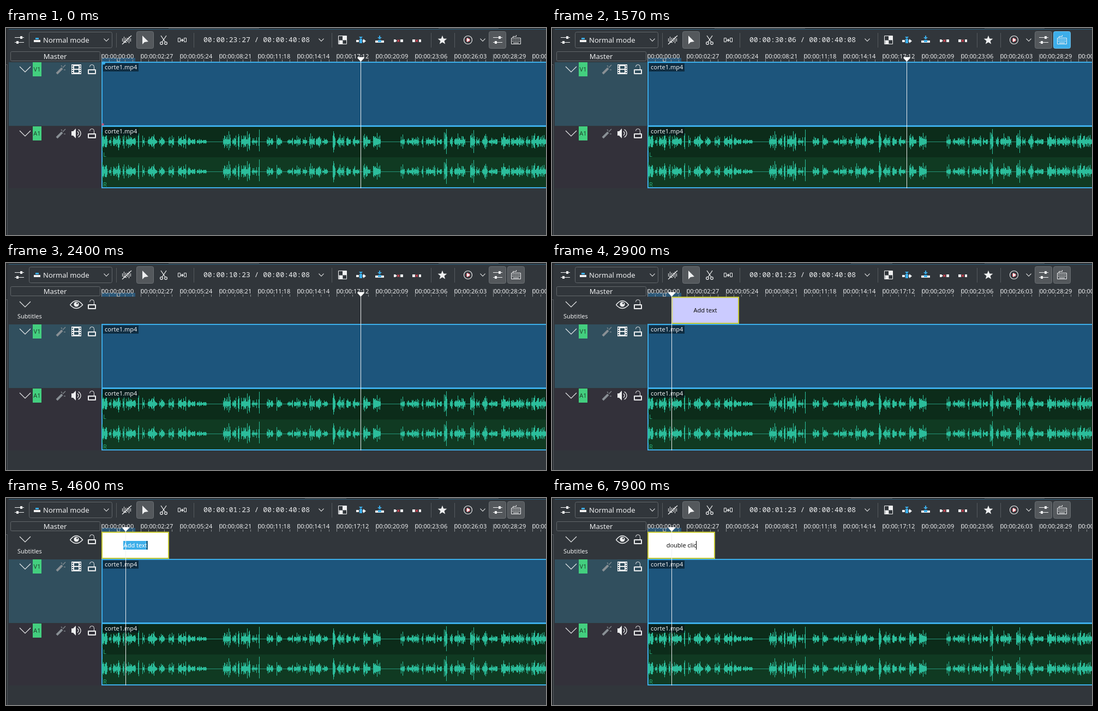
These frames come from a looping animation (990x381 px, 8 s). An HTML page with a canvas:

```html
<!DOCTYPE html>
<html lang="en">
<head>
<meta charset="utf-8">
<title>Subtitle track</title>
<style>
html, body { margin: 0; width: 100%; height: 100%; overflow: hidden; background: #31363b; }
canvas { display: block; width: 990px; height: 381px; }
</style>
</head>
<body>
<canvas id="stage" width="990" height="381"></canvas>
<script>
const ctx = document.getElementById('stage').getContext('2d');
const LOOP = 8000;
const BG = '#31363b', FG = '#eff0f1', BLUE = '#3daee9', GREY = '#62676b', WAVE = '#2bbd9b', RED = '#da4453';
const SMALL = '11px "Noto Sans", sans-serif';
const NORMAL = '13px "Noto Sans", sans-serif';
const MONO = '13px "Noto Sans Mono", monospace';
const ORIGIN = 175.5, TICK = 71.85;

// Bursts of sound: start, length, half height
const bursts = [
  [176, 10, 17], [189, 4, 8], [196, 14, 15], [214, 3, 13], [220, 18, 12], [242, 2, 15], [250, 4, 11],
  [260, 17, 13], [281, 10, 9], [298, 10, 11], [315, 16, 13], [333, 14, 8], [350, 18, 5], [398, 14, 19],
  [415, 7, 11], [425, 3, 14], [431, 17, 19], [451, 10, 8], [463, 2, 22], [478, 12, 9], [496, 10, 12],
  [516, 10, 7], [528, 12, 11], [544, 8, 8], [556, 10, 15], [568, 10, 10], [580, 10, 6], [599, 5, 19],
  [607, 13, 13], [624, 8, 9], [636, 12, 10], [655, 13, 14], [673, 14, 16], [723, 8, 13], [735, 22, 9],
  [762, 3, 10], [770, 17, 11], [790, 9, 7], [803, 6, 23], [814, 5, 9], [822, 20, 15], [851, 9, 21],
  [862, 6, 8], [873, 10, 14], [885, 16, 7], [908, 16, 15], [926, 24, 11], [953, 8, 10], [963, 27, 15]
];

// Text typed into the subtitle, by time
const typed = 'double clic';
const keys = [5700, 5870, 6070, 6370, 6570, 6700, 6900, 7130, 7330, 7600, 7900];

function random(seed) {
  return () => (seed = (seed * 16807) % 2147483647) / 2147483647;
}
function rect(color, x, y, w, h) {
  ctx.fillStyle = color;
  ctx.fillRect(x, y, w, h);
}
function frame(color, x, y, w, h, r = 0, fill) {
  ctx.beginPath();
  ctx.roundRect(x + 0.5, y + 0.5, w - 1, h - 1, r);
  if (fill) { ctx.fillStyle = fill; ctx.fill(); }
  ctx.strokeStyle = color;
  ctx.lineWidth = 1;
  ctx.stroke();
}
function trace(pts) {
  ctx.beginPath();
  for (let i = 0; i < pts.length; i += 2) ctx.lineTo(pts[i], pts[i + 1]);
}
function line(color, width, ...pts) {
  trace(pts);
  ctx.strokeStyle = color;
  ctx.lineWidth = width;
  ctx.stroke();
}
function shape(color, ...pts) {
  trace(pts);
  ctx.fillStyle = color;
  ctx.fill();
}
function disc(color, x, y, r, ring) {
  ctx.beginPath();
  ctx.arc(x, y, r, 0, 7);
  if (ring) { ctx.strokeStyle = color; ctx.lineWidth = ring; ctx.stroke(); }
  else { ctx.fillStyle = color; ctx.fill(); }
}
function text(str, x, y, font = SMALL, color = FG, align = 'left') {
  ctx.font = font;
  ctx.fillStyle = color;
  ctx.textAlign = align;
  ctx.fillText(str, x, y);
}
function chevron(x, y, w, h) {
  line(FG, 1.1, x - w, y - h, x, y + h, x + w, y - h);
}
function timecode(n) {
  const two = v => String(v).padStart(2, '0');
  return '00:00:' + two(Math.floor(n / 30)) + ':' + two(n % 30);
}

function sliders(x) {
  rect(FG, x - 8, 17, 17, 1);
  rect(FG, x - 8, 26, 17, 1);
  rect(FG, x + 2, 15, 4, 5);
  rect(FG, x - 5, 24, 4, 5);
}
function pressed(x) {
  frame('#6b7074', x, 6, 32, 32, 3, '#54585c');
}
function cross(x, y) {
  line(RED, 1.4, x - 2, y - 2, x + 2, y + 2);
  line(RED, 1.4, x - 2, y + 2, x + 2, y - 2);
}
function lock(x, y) {
  frame(FG, x - 7, y, 15, 9);
  frame(FG, x - 6, y + 1, 13, 7);
  ctx.beginPath();
  ctx.arc(x + 0.5, y - 4.5, 4, Math.PI, 0);
  ctx.lineTo(x + 4.5, y);
  ctx.stroke();
}
function wand(y) {
  line('#899095', 4, 93, y + 8, 103, y - 2);
  line('#899095', 1.2, 104, y - 3, 109, y - 8);
  line('#899095', 1.2, 101, y - 7, 103, y - 5);
  line('#899095', 1.2, 106, y + 1, 109, y + 1);
}

function keyboard(t) {
  if (t >= 1530 && t < 2030) frame('#6cc3f0', 919, 6, 32, 32, 3, BLUE);
  else if (t >= 2030) pressed(919);
  else if (t >= 1030) frame(BLUE, 919, 6, 32, 32, 3);
  frame(FG, 926, 18, 18, 12);
  line(FG, 1, 929.5, 18, 929.5, 15.5, 935.5, 15.5, 935.5, 13);
  for (let r = 0; r < 2; r++)
    for (let c = 0; c < 6; c++) rect(FG, 928 + c * 2.5, 21 + r * 3, 1.3, 1.3);
  rect(FG, 930, 27, 10, 1);
}

function toolbar(t, code) {
  rect('#2a2e32', 0, 0, 990, 2);
  const left = t < 2900 ? [298, 166] : [548, 76];
  rect('#565b5f', left[0], 0, left[1], 1);
  rect('#565b5f', 793, 0, 110, 1);
  rect(t >= 30 && t < 1030 ? '#44494e' : '#2d617f', 5, 2, 985, 1);
  rect('#262a2e', 0, 0, 2, 381);
  rect('#555a5e', 2, 67, 1, 314);
  rect('#555a5e', 0, 67, 2, 1);
  for (const x of [202, 344, 597, 779, 822]) rect('#555a5e', x, 9, 1, 27);

  sliders(24);
  frame(GREY, 42, 7, 153, 30, 3);
  rect(FG, 51, 22, 12, 4);
  rect(BLUE, 54, 18, 6, 3);
  text('Normal mode', 68, 27, NORMAL);
  chevron(184, 22, 4.5, 2.3);

  // Waveform mix
  for (let i = 0; i < 6; i++) {
    const h = [3, 6, 4, 4, 6, 3][i];
    rect(FG, 213 + i * 3, 22 - h, 1, 2 * h);
  }
  line(FG, 1.2, 213, 30, 230, 14);
  line(FG, 1, 215, 25, 221, 27);

  // Selection arrow
  pressed(239);
  shape(FG, 250, 14, 250, 30, 254, 26, 261, 25);

  // Scissors
  line(FG, 1.3, 284, 14, 292, 26);
  line(FG, 1.3, 294, 14, 286, 26);
  disc(FG, 285, 28, 2.4, 1.2);
  disc(FG, 293, 28, 2.4, 1.2);

  // Spacer
  frame(FG, 315, 18, 5, 8);
  frame(FG, 326, 18, 5, 8);
  line(FG, 1, 320, 22.5, 326, 22.5);
  rect(FG, 322, 20, 2, 5);

  text(code + ' / 00:00:40:08', 362, 26, MONO);
  chevron(578, 22, 4.5, 2.3);

  // Mix square
  frame(FG, 609, 14, 16, 16);
  rect('#7d8286', 610, 15, 14, 14);
  rect(BG, 610, 15, 7, 7);
  rect(FG, 617, 15, 7, 7);
  rect(FG, 611, 23, 6, 6);
  rect(BG, 618, 23, 6, 6);

  // Insert and overwrite
  rect(FG, 642, 22, 5, 4);
  rect(BLUE, 648, 20, 5, 8);
  rect(FG, 654, 22, 2, 4);
  shape(FG, 655, 20, 660, 24, 655, 28);
  shape(BLUE, 647, 16, 654, 16, 650.5, 20);
  rect(FG, 677, 23, 16, 4);
  rect(BLUE, 682, 22, 6, 4);
  shape(BLUE, 681, 17, 689, 17, 685, 21);
  rect(BLUE, 684, 14, 2, 4);

  // Extract and lift
  shape(FG, 711, 21, 714, 21, 717, 23.5, 714, 26, 711, 26);
  cross(719.5, 23.5);
  rect(FG, 723, 21, 5, 5);
  rect(FG, 745, 21, 5, 5);
  cross(753, 23.5);
  rect(FG, 757, 21, 4, 5);

  const star = [];
  for (let i = 0; i < 10; i++) {
    const a = i * Math.PI / 5 - Math.PI / 2, r = i % 2 ? 3.7 : 8.8;
    star.push(800 + r * Math.cos(a), 22.5 + r * Math.sin(a));
  }
  shape(FG, ...star);

  disc(FG, 847, 22, 7.5, 1.2);
  disc(RED, 847, 22, 3.6);
  shape(FG, 845, 18, 851, 22, 845, 26);
  chevron(874, 22, 4.5, 2.3);
  pressed(885);
  sliders(901);
  keyboard(t);
}

function ruler() {
  frame(GREY, 8, 43, 165, 18, 2);
  text('Master', 90, 57, NORMAL, FG, 'center');
  rect('#2c5878', 175, 55, 62, 7);
  for (let i = 0; i < 58; i++) {
    const x = Math.round(ORIGIN + i * TICK / 5 - 0.5);
    const h = i % 5 ? 4 : 14;
    rect('#8b9094', x, 62 - h, 1, h);
  }
  for (let n = 0; n < 12; n++) {
    const count = n * 87 - (n && n % 5 === 0 ? 1 : 0);
    text(timecode(count), Math.round(ORIGIN + n * TICK - 0.5), 56);
  }
  frame('#a4a9ad', 203, 55, 6, 7);
}

function header(y, h, color, name) {
  rect(color, 5, y, 169, h);
  chevron(35, y + 13, 10, 5);
  rect('#43cf7f', 49, y, 16, 26);
  text(name, 57, y + 17, SMALL, '#20452f', 'center');
  wand(y + 13);
  lock(157, y + 13);
}

function film(y) {
  rect(FG, 120, y - 9, 18, 18);
  rect('#314f5e', 125, y - 6, 8, 5);
  rect('#314f5e', 125, y + 1, 8, 5);
  for (let i = 0; i < 4; i++) {
    rect('#314f5e', 121, y - 7 + i * 4, 2, 2);
    rect('#314f5e', 135, y - 7 + i * 4, 2, 2);
  }
}

function speaker(y) {
  shape(FG, 120, y - 4, 123, y - 4, 128, y - 9, 128, y + 9, 123, y + 4, 120, y + 4);
  ctx.strokeStyle = FG;
  ctx.lineWidth = 1.3;
  for (const r of [4, 8]) {
    ctx.beginPath();
    ctx.arc(129, y, r, -1.1, 1.1);
    ctx.stroke();
  }
}

function clipName(y) {
  rect('rgba(8,22,32,0.62)', 178, y, 65, 15);
  text('corte1.mp4', 181, y + 11);
}

function wave(mid) {
  const rnd = random(4711);
  rect('#249478', 177, mid, 813, 1);
  for (const [x, w, a] of bursts) {
    const peak = Math.floor(rnd() * w);
    for (let i = 0; i < w; i++) {
      const k = i === peak ? 1 : 0.18 + 0.62 * rnd() ** 1.4;
      const up = Math.round(a * k), down = Math.round(a * k * (0.75 + 0.25 * rnd()));
      rect(WAVE, x + i, mid - up, 1, up + down + 1);
    }
  }
}

function tracks(y, handles) {
  header(y, 117, '#314f5e', 'V1');
  film(y + 13);
  header(y + 118, 114, '#33313a', 'A1');
  speaker(y + 131);

  rect(BLUE, 175, y - 1, 815, 233);
  rect('#1d557c', 177, y + 1, 813, 115);
  rect('#0c2c1a', 177, y + 119, 813, 56);
  rect('#103a22', 177, y + 175, 813, 55);
  wave(y + 146);
  wave(y + 201);
  text('L', 178, y + 174, SMALL, '#27a873');
  text('R', 178, y + 229, SMALL, '#27a873');
  clipName(y + 2);
  clipName(y + 120);
  if (handles) {
    disc(BLUE, 179, y + 1.5, 3);
    disc('#c2557a', 177.5, y + 114.5, 2.2);
  }
}

function subtitleHeader() {
  chevron(35, 76, 10, 5);
  text('Subtitles', 21, 102);
  ctx.beginPath();
  ctx.moveTo(117.5, 77);
  ctx.quadraticCurveTo(129, 62, 140.5, 77);
  ctx.quadraticCurveTo(129, 90, 117.5, 77);
  ctx.strokeStyle = FG;
  ctx.lineWidth = 1.4;
  ctx.stroke();
  disc(FG, 129, 76, 4.6);
  disc(BG, 130.5, 74.5, 1.4);
  lock(157, 76);
}

function subtitle(t) {
  const x = t < 3500 ? 219 : t < 3570 ? 197 : 175;
  const editing = t >= 4600;
  rect('#c6c834', x, 62, 124, 50);
  rect(editing ? '#ffffff' : '#cbcbff', x + 2, 64, 120, 46);
  if (!editing) {
    text('Add text', x + 62, 91, SMALL, '#111', 'center');
    return;
  }
  const count = keys.filter(k => t >= k).length;
  const str = count ? typed.slice(0, count) : 'Add text';
  ctx.font = SMALL;
  const w = ctx.measureText(str).width, left = 237.2 - w / 2;
  if (!count) rect(BLUE, 215, 79, 45, 16);
  text(str, left, 91, SMALL, count ? '#111' : '#fff');
  if (t < 5070 || t >= 5570) rect('#000', Math.round(left + w - 0.3), 79, 1, 16);
}

function playhead(x, bottom) {
  rect(FG, x, 62, 1, bottom - 62);
  shape('#fff', x - 5.5, 53.5, x + 6.5, 53.5, x + 6.5, 55.5, x + 0.5, 62, x - 5.5, 55.5);
}

// Pointer position, in video frames
function position(t) {
  if (t < 700) return 717;
  if (t < 830) return Math.round(717 + 189 * (Math.floor((t - 700) / 32) + 1) / 5);
  if (t < 2030) return 906;
  const p = Math.min(1, (Math.floor((t - 2030) / 40) + 1) / 16);
  return Math.round(906 - 853 * p * p * (3 - 2 * p));
}

function draw(t) {
  rect(BG, 0, 0, 990, 381);
  toolbar(t, timecode(position(t)));
  ruler();
  const open = t >= 1670;
  const y = open ? 113 : 63;
  tracks(y, t < 30 || (t >= 700 && t < 1030));
  if (open) subtitleHeader();
  if (t >= 2870) subtitle(t);
  playhead(t < 2670 ? 650 : 219, y + 232);
}

const start = performance.now();
function tick() {
  draw((performance.now() - start) % LOOP);
  requestAnimationFrame(tick);
}
tick();
</script>
</body>
</html>
```
